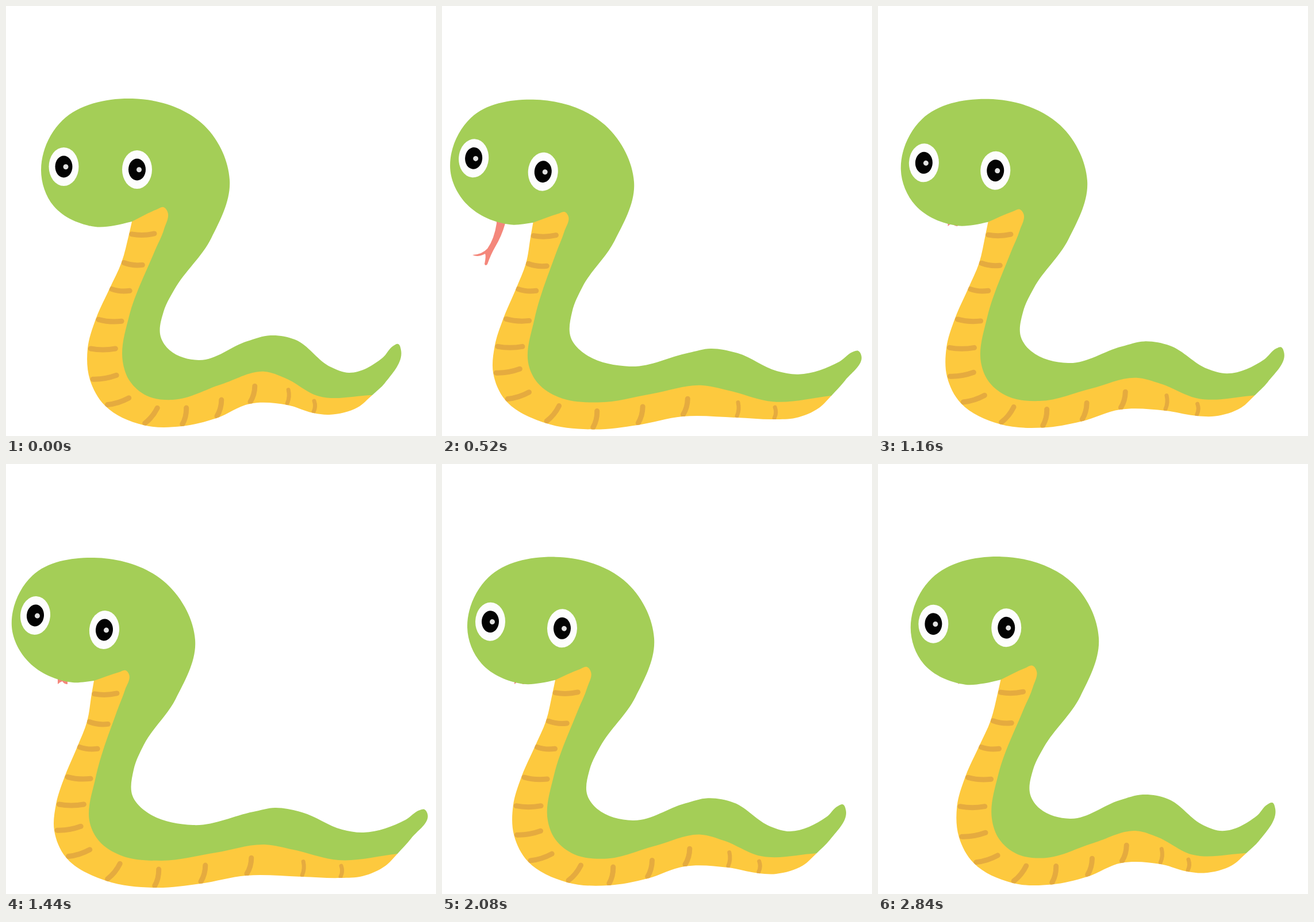
An HTML page for the animation above (2880 ms loop, 748 px wide and 748 px high).

```html
<!DOCTYPE html>
<html lang="en">
<head>
<meta charset="utf-8">
<title>Swaying snake</title>
<style>
  html, body { margin: 0; height: 100%; overflow: hidden; background: #fff; }
  svg { display: block; width: 100%; height: 100%; }
</style>
</head>
<body>
<svg viewBox="0 0 748 748">
  <clipPath id="bellyClip"><path id="clipShape"/></clipPath>
  <path id="tongue" fill="#f4877b"/>
  <path id="body" fill="#a4ce57"/>
  <path id="belly" fill="#fdc93e"/>
  <g id="stripes" clip-path="url(#bellyClip)" fill="none" stroke="#e5ab3f" stroke-linecap="round"></g>
  <g id="eyes"></g>
</svg>
<script>
const STEP = 40, CYCLE = 960;
const $ = id => document.getElementById(id);
const mix = (a, b, p) => a + (b - a) * p;

// Each shape has two poses as flat x, y lists: upright and leaning.
const outlineUp = [219,375, 188,382, 155,384, 83,348, 61,285, 98,199, 220,161, 345,208, 389,302,
  357,404, 293,493, 274,532, 269,575, 285,599, 335,616, 420,583, 460,573, 502,580, 565,628,
  597,638, 655,612, 674,591, 682,588, 687,598, 659,656, 637,677];
const outlineLean = [153,377, 138,379, 116,380, 40,345, 10,283, 46,194, 153,163, 278,207, 329,306,
  295,409, 240,488, 222,532, 220,577, 240,602, 325,628, 430,605, 468,598, 515,606, 585,636,
  622,641, 695,619, 720,602, 728,601, 733,608, 705,651, 681,678];

// After the chin, the outer belly edge has one point at the foot of each stripe.
const outerUp = [219,375, 214,397, 201,446, 180,492, 156,545, 142,596, 146,650, 172,695, 239,729,
  306,731, 366,717, 424,692, 489,694, 535,708, 562,711, 612,698, 637,677];
const outerLean = [153,377, 149,400, 141,448, 124,492, 102,544, 87,592, 84,638, 104,684, 174,725,
  258,737, 338,730, 418,716, 515,718, 582,720, 620,717, 660,699, 681,678];
const innerUp = [637,677, 545,679, 485,647, 450,636, 375,658, 290,685, 245,678, 215,652, 203,618,
  214,540, 258,428, 275,388, 281,358, 274,350, 262,354, 219,375];
const innerLean = [681,678, 578,689, 500,671, 450,662, 365,676, 270,690, 200,681, 162,656, 146,625,
  156,545, 193,430, 207,393, 214,366, 208,359, 197,362, 153,377];
const stripeVectors = [40,-1, 33,4, 32,3, 41,3, 44,0, 42,-7, 38,-12, 22,-27, 7,-29, 8,-29,
  8,-28, 2,-24, 1,-19];
const eyesUp = [100.5,279.5, 228,284.5];
const eyesLean = [51,263.5, 171,288.5];

const tongueOut = "M94 365L95 378Q91 405 79 422Q70 432 53 433Q62 438 75 431Q77 434 74 449" +
  "Q76 453 79 449Q85 432 92 420Q104 400 110 378V365Z";
const tongueIn = "M90 370V383Q94 379 98 378Q101 383 107 383V370Z";

function pose(up, lean, p) {
  const points = [];
  for (let i = 0; i < up.length; i += 2)
    points.push([mix(up[i], lean[i], p), mix(up[i + 1], lean[i + 1], p)]);
  return points;
}

// Smooth curve segments through the points; the ends stay sharp.
function curve(points) {
  const last = points.length - 1;
  const gap = (a, b) => Math.hypot(b[0] - a[0], b[1] - a[1]);
  const tangents = points.map((q, i) => {
    const a = points[Math.max(i - 1, 0)], b = points[Math.min(i + 1, last)];
    const before = gap(a, q) || 1, after = gap(q, b) || 1;
    const d = q.map((v, k) => (v - a[k]) / before ** 1.5 + (b[k] - v) / after ** 1.5);
    const size = Math.hypot(...d);
    return d.map(v => v / size);
  });
  let d = "";
  for (let i = 0; i < last; i++) {
    const a = points[i], b = points[i + 1], handle = gap(a, b) / 3;
    const c1 = a.map((v, k) => v + tangents[i][k] * handle);
    const c2 = b.map((v, k) => v - tangents[i + 1][k] * handle);
    d += `C${c1} ${c2} ${b}`;
  }
  return d;
}

const along = (q, v, s) => [q[0] + v[0] * s, q[1] + v[1] * s];

function bentLine(foot, v) {
  const a = along(foot, v, .12), b = along(foot, v, 1.1), m = along(foot, v, .6);
  const bend = 4 / Math.hypot(...v);
  return `M${a}Q${along(m, [-v[1], v[0]], bend)} ${b}`;
}

const vectors = pose(stripeVectors, stripeVectors, 0);
const stripes = vectors.map((_, i) => {
  const path = document.createElementNS("http://www.w3.org/2000/svg", "path");
  path.setAttribute("stroke-width", i < 11 ? 9 : 7);
  return $("stripes").appendChild(path);
});

$("eyes").innerHTML = `<g>
  <ellipse rx="26" ry="33.5" fill="#fdfdfd"/>
  <ellipse rx="15" ry="19" fill="#030303"/>
  <circle cx="3.5" cy=".3" r="4.5" fill="#e0e0e0"/></g>`.repeat(2);

function draw(time) {
  const t = Math.floor(time / STEP) * STEP % CYCLE;
  const p = 1 - Math.abs(t / (CYCLE / 2) - 1);

  const edge = pose(outlineUp, outlineLean, p);
  const outer = pose(outerUp, outerLean, p);
  const inner = pose(innerUp, innerLean, p);
  const bellyPath = `M${outer[0]}${curve(outer)}${curve(inner)}Z`;
  $("belly").setAttribute("d", bellyPath);
  $("clipShape").setAttribute("d", bellyPath);

  // The green runs under the middle of the belly so no seam shows.
  const middle = vectors.map((v, i) => along(outer[i + 1], v, .6)).reverse();
  $("body").setAttribute("d", `M${edge[0]}${curve(edge)}L${middle.join("L")}Z`);

  stripes.forEach((path, i) => path.setAttribute("d", bentLine(outer[i + 1], vectors[i])));

  pose(eyesUp, eyesLean, p).forEach((q, i) =>
    $("eyes").children[i].setAttribute("transform", `translate(${q}) rotate(${5 * p})`));

  const flick = t >= 520 && t < 720;
  $("tongue").setAttribute("d", flick ? tongueOut : tongueIn);
  $("tongue").setAttribute("transform", `translate(${((flick ? 11 / 12 : 1) - p) * 54})`);
}

const start = performance.now();
function tick() {
  draw(performance.now() - start);
  requestAnimationFrame(tick);
}
tick();
</script>
</body>
</html>
```
